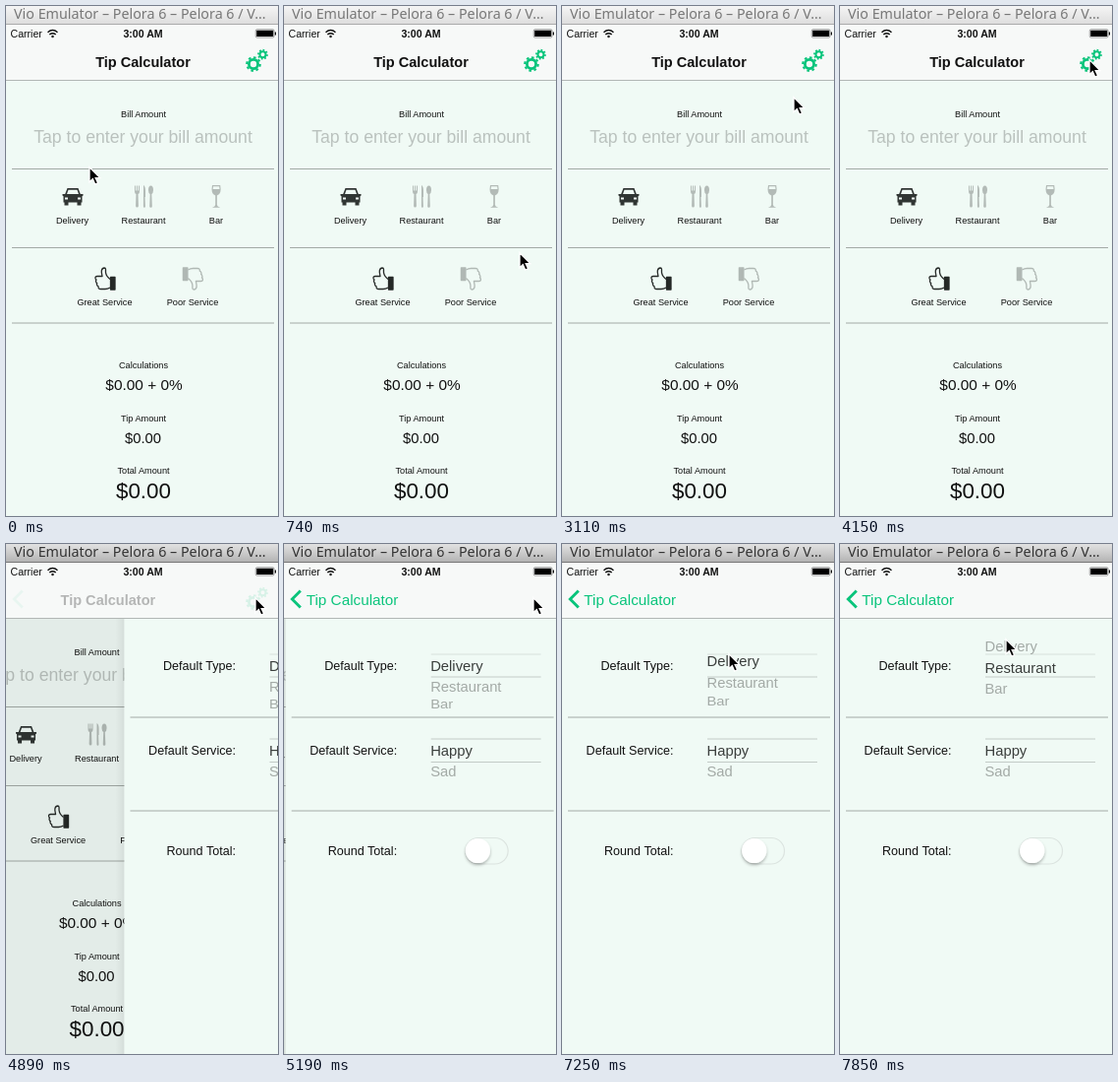
Recreate the animation shown at these times as an HTML page. Size 277x518 px, loop 8000 ms.

```html
<!DOCTYPE html>
<html lang="en">
<head>
<meta charset="utf-8">
<title>Tip Calculator</title>
<style>
  html, body { margin: 0; width: 100%; height: 100%; overflow: hidden; background: #f0faf5; }
  svg { display: block; width: 277px; height: 518px; font-family: "Liberation Sans", Arial, sans-serif; }
  text { fill: #111; }
  .mid { text-anchor: middle; }
  .end { text-anchor: end; font-size: 12.6px; }
  .label { font-size: 9.2px; text-anchor: middle; }
  .caption { font: 14.3px "Noto Sans", sans-serif; fill: #777; }
  .active .caption { fill: #333; }
  .bar { fill: url(#idle); }
  .active .bar { fill: url(#lit); }
  .edge { stroke: #aaa; }
  .active .edge { stroke: #777; }
  .rule { stroke: #a3aaa6; }
  .thin { stroke: #c3cbc7; }
  .faint { stroke: #d8e1dc; }
  .row { font-size: 14.8px; }
  .dim text { fill: #a3aaa6; }
  .lit text { fill: #3a3e3c; }
  .green { fill: #08c47b; }
  .gear { fill: none; stroke: #08c47b; }
  .hand { fill: none; stroke: currentColor; stroke-width: 1.3; stroke-linejoin: round; }
</style>
</head>
<body>
<svg id="stage" viewBox="0 0 277 518">
  <defs>
    <linearGradient id="idle" x2="0" y2="1"><stop stop-color="#f5f5f5"/><stop offset="1" stop-color="#dedede"/></linearGradient>
    <linearGradient id="lit" x2="0" y2="1"><stop stop-color="#e2e2e2"/><stop offset="1" stop-color="#b4b4b4"/></linearGradient>
    <linearGradient id="shade"><stop stop-opacity="0"/><stop offset="1" stop-opacity=".07"/></linearGradient>
    <filter id="soft" x="-30%" y="-30%" width="160%" height="170%"><feDropShadow dx="0" dy="2" stdDeviation="1.4" flood-opacity=".28"/></filter>
    <clipPath id="typeBox"><rect x="140" y="96" width="125" height="72"/></clipPath>
    <clipPath id="typeBand"><rect x="140" y="113" width="125" height="22"/></clipPath>
    <clipPath id="moodBox"><rect x="140" y="182" width="125" height="72"/></clipPath>
    <clipPath id="moodBand"><rect x="140" y="199" width="125" height="22"/></clipPath>
    <g id="thumb">
      <path d="M111 275.500h-4.500v12.500h4.500z" fill="currentColor"/>
      <path d="M106 277.500q-4-3-4.500-7v-3q0-1.500-1.500-1.500-3 .5-2.700 4.500l.7 4h-5q-2.200 0-2 2 .2 1.500 1 1.500-1 1-.3 2.200.4 1.200 1 1.300-.6 1.200.2 2.300.5.8 1.200 1-.4 2.700 2.400 2.700h4.500q2.500 0 5-1.500"/>
    </g>
  </defs>

  <g id="home">
    <rect y="76" width="277" height="442" fill="#f0faf5"/>
    <text class="label" x="140" y="113">Bill Amount</text>
    <text class="mid" x="139.500" y="139" font-size="17.65" style="fill:#bac2be">Tap to enter your bill amount</text>
    <path class="rule" d="M6 165.500h267M6 245.500h267M6 322h267"/>

    <g fill="#303533">
      <path d="M62.500 185h11l2.300 6h2.700v1.500l-1 .7v6.300h-1v3h-4v-3h-9v3h-4v-3h-1v-6.300l-1-.7v-1.500h2.700z"/>
      <path d="M63.500 186.700h9l1.500 4.300h-12z" fill="#f0faf5"/>
      <path d="M60 194.500h3v2h-3zM73 194.500h3v2h-3z" fill="#f0faf5"/>
    </g>
    <g fill="#b3bbb7">
      <path d="M131 182.500h1v5h1v-5h1v5h1v-5h1v6q0 2-1.500 2.500l.4 12q0 1.500-1.400 1.500t-1.400-1.500l.4-12q-1.500-.5-1.500-2.500z"/>
      <path d="M140 182q2 1 2 6v6h-.5l.4 9.500q0 1.200-1 1.200t-1-1.200z"/>
      <path d="M147.500 182.500q2.500 0 2.500 4.500 0 3-1.700 4l.5 12.500q0 1.200-1.300 1.200t-1.300-1.200l.5-12.500q-1.700-1-1.700-4 0-4.500 2.500-4.500z"/>
      <path d="M210 182h8.200q1.800 9-3.300 10.500v9.500q0 1.500 3.300 2.700h-8.200q3.200-1.200 3.200-2.700v-9.500q-5-1.500-3.200-10.500z"/>
      <path d="M211 183.200h6.200l.3 2.800h-6.800z" fill="#f0faf5"/>
    </g>
    <text class="label" x="67.500" y="221">Delivery</text>
    <text class="label" x="140" y="221">Restaurant</text>
    <text class="label" x="214" y="221">Bar</text>

    <use href="#thumb" class="hand" color="#252927"/>
    <use href="#thumb" class="hand" color="#b0b8b4" transform="rotate(180 145.700 277)"/>
    <text class="label" x="100.500" y="304">Great Service</text>
    <text class="label" x="190" y="304">Poor Service</text>

    <text class="label" x="140" y="367.500">Calculations</text>
    <text class="mid" x="140.500" y="390" font-size="15.4">$0.00 + 0%</text>
    <text class="label" x="140" y="422">Tip Amount</text>
    <text class="mid" x="139.500" y="444" font-size="14.8">$0.00</text>
    <text class="label" x="140" y="475">Total Amount</text>
    <text class="mid" x="140" y="499.500" font-size="22.4">$0.00</text>
  </g>
  <rect id="veil" y="76" width="277" height="442"/>

  <g id="settings">
    <rect id="shadow" x="-9" y="76" width="9" height="442" fill="url(#shade)"/>
    <rect y="76" width="277" height="442" fill="#f0faf5"/>
    <text class="end" x="113.500" y="127.700">Default Type:</text>
    <text class="end" x="113.500" y="213.700">Default Service:</text>
    <text class="end" x="113.500" y="315.700">Round Total:</text>
    <path class="rule" d="M6 176h267M6 271h267"/>
    <path class="faint" d="M148 112h112"/>
    <path class="thin" d="M148 135h112M148 198h112M148 221.500h112"/>
    <g id="type"></g>
    <g id="mood"></g>
    <rect x="183" y="298.500" width="43.500" height="26.500" rx="13.250" fill="#f0faf5" stroke="#dce4e0" stroke-width="1.200"/>
    <circle cx="195.700" cy="311.500" r="12.600" fill="#fff" filter="url(#soft)"/>
  </g>

  <rect y="19" width="277" height="56" fill="#f7f9f8"/>
  <path d="M0 75.500h277" stroke="#b2b7b5"/>
  <text x="4.500" y="32" font-size="10.600">Carrier</text>
  <g fill="none" stroke="#111" stroke-width="1.500">
    <path d="M42.500 26.700q5-4.400 10 0M44.300 29q3.200-2.600 6.400 0"/>
    <circle cx="47.500" cy="31" r=".5"/>
  </g>
  <text class="mid" x="139.500" y="32" font-size="10.600" font-weight="bold">3:00 AM</text>
  <rect x="254.300" y="23.800" width="18.700" height="8.200" rx="1.200" fill="none" stroke="#777" stroke-width=".7"/>
  <path d="M255.200 24.800h17v6.300h-17zM273.800 26.500h1.200v3h-1.200z"/>

  <text id="title" class="mid" y="62" font-size="14.550" font-weight="bold">Tip Calculator</text>
  <g id="back">
    <path d="M16.800 47.500l-8.500 8.500 8.500 8.500" fill="none" stroke="#08c47b" stroke-width="2.900"/>
    <text id="backText" class="green" y="61.600" font-size="15.300">Tip Calculator</text>
  </g>
  <g id="gears" class="gear">
    <circle cx="252" cy="59" r="4.600" stroke-width="2.800"/>
    <circle cx="252" cy="59" r="6.700" stroke-width="2.200" pathLength="16" stroke-dasharray="1"/>
    <circle cx="261.500" cy="49.200" r="3" stroke-width="2"/>
    <circle cx="261.500" cy="49.200" r="4.500" stroke-width="1.800" pathLength="16" stroke-dasharray="1"/>
  </g>

  <rect class="bar" width="277" height="18"/>
  <path class="edge" d="M0 18.500h277"/>
  <text class="caption" x="8" y="13">Vio Emulator – Pelora 6 – Pelora 6 / V…</text>

  <path id="cursor" d="M0 0v15l3.300-3 2.400 5.400 2.900-1.300-2.400-5.200h4.600z" stroke="#fff" stroke-width="1.300"/>
</svg>

<script>
const LOOP = 8000;
const $ = id => document.getElementById(id);

// Each move: first step, last step, and evenly timed pointer positions.
const moves = [
  [0, 0, [[85, 163]]],
  [150, 1180, [[110, 122], [160, 93], [211, 105], [238, 160], [240, 250], [236, 350], [226, 440], [211, 500]]],
  [1630, 2670, [[172, 509], [105, 480], [45, 400], [13, 300], [12, 210], [50, 140], [115, 104], [197, 92]]],
  [2820, 3110, [[212, 92], [227, 92], [236, 92]]],
  [3560, 4150, [[238, 87], [244, 76], [249, 65], [253, 57], [254, 54]]],
  [5780, 6370, [[247, 61], [229, 79], [204, 101], [181, 118], [171, 124]]],
  [6960, 7850, [[171, 121], [171, 116], [170, 111], [170, 106], [170, 102], [169, 98], [169, 96]]]
];

const CLICK = 4750, DRAG = 6960;
const slide = [[CLICK, 0], [4890, .565], [5040, .95], [5190, .994], [5330, 1]];

function pointerAt(t) {
  const [start, end, points] = moves.findLast(m => t >= m[0]);
  const gap = (end - start) / (points.length - 1) || 1;
  return points[Math.min(points.length - 1, Math.floor((t - start + 6) / gap))];
}

function makePicker(id, labels, center) {
  const rows = [];
  for (const [kind, clip] of [["dim", "Box"], ["lit", "Band"]]) {
    const layer = document.createElementNS("http://www.w3.org/2000/svg", "g");
    layer.setAttribute("class", "row " + kind);
    layer.setAttribute("clip-path", `url(#${id}${clip})`);
    labels.forEach((label, index) => {
      const row = document.createElementNS(layer.namespaceURI, "text");
      row.textContent = label;
      layer.append(row);
      rows.push({ row, index, lit: kind === "lit" });
    });
    $(id).append(layer);
  }
  // Rows sit on a turning drum, so they flatten away from the centre.
  return scroll => rows.forEach(({ row, index, lit }) => {
    const angle = (index - scroll) * .415;
    const y = center + 52.8 * Math.sin(angle);
    const squash = (1 + Math.cos(angle)) / 2;
    row.setAttribute("transform", `translate(147.500 ${y}) scale(1 ${squash}) translate(0 5.200)`);
    const inBand = Math.abs(index - scroll) < .5;
    row.style.display = lit === inBand ? "" : "none";
  });
}

const turnType = makePicker("type", ["Delivery", "Restaurant", "Bar"], 124);
makePicker("mood", ["Happy", "Sad"], 210)(0);

function shift(id, x, y = 0) {
  $(id).setAttribute("transform", `translate(${x} ${y})`);
}

function draw(t) {
  const [x, y] = pointerAt(t);
  const step = slide.findLast(s => t >= s[0]);
  const p = step ? step[1] : 0;

  shift("cursor", x, y + .7);
  $("stage").classList.toggle("active", t >= CLICK);

  shift("home", -84 * p);
  shift("settings", 277 * (1 - p));
  $("settings").style.display = p ? "" : "none";
  $("shadow").style.opacity = Math.min(1, 2 * (1 - p));
  $("veil").style.opacity = .1 * p;

  $("title").setAttribute("x", 139.5 - 63 * p);
  $("title").style.opacity = (1 - p) ** 1.5;
  $("back").style.opacity = p < .6 ? p * .1 : (p - .6) / .4;
  $("backText").setAttribute("x", 22.3 + 60 * (1 - p));
  $("backText").style.opacity = p < .6 ? 0 : 1;
  $("gears").style.opacity = step ? .3 * (1 - p) : 1;

  turnType(t >= DRAG ? Math.max(0, 116 - y) / 21.5 : 0);
}

const begin = performance.now();
function tick() {
  draw((performance.now() - begin) % LOOP);
  requestAnimationFrame(tick);
}
tick();
</script>
</body>
</html>
```
